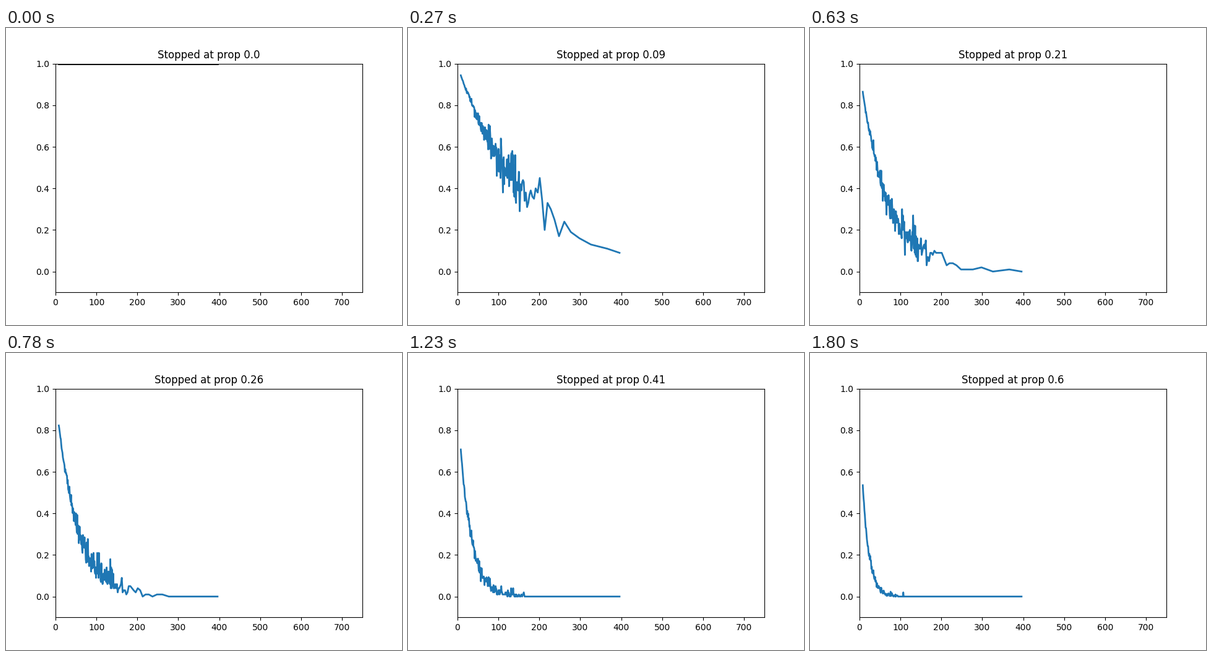
These frames come from a looping animation (640x480 px, 1830 ms). A matplotlib script:

```python
import numpy as np
import matplotlib.pyplot as plt
from matplotlib.animation import FuncAnimation

FRAMES = 61
INTERVAL = 30
BLUE = "#1f77b4"
LONGEST = 396

plt.rcParams["text.kerning_factor"] = 6
rng = np.random.default_rng(7)


def make_lengths():
    """Every whole length at first, then ever wider gaps."""
    xs, x = [], 8
    while x < LONGEST - 15:
        xs.append(x)
        x += max(1, round((x / 130) ** 4))
    return np.array(xs + [LONGEST])


def make_decay(xs):
    """Decay strength at prop 0.09: a smooth trend, roughest mid-range."""
    trend = np.interp(xs, [0, 100, 150, 200, 250, 290, 340, LONGEST],
                      [0.009, 0.61, 0.9, 1.1, 1.6, 1.9, 2.15, 2.4])
    rough = 0.15 * np.clip(np.sin(np.pi * xs / 300), 0, 1)
    return trend * (1 + rough * rng.standard_normal(xs.size))


def rate(p):
    return -np.log(1 - p * (0.575 + 0.305 * p))


def survival(p):
    """Share of runs left at each length, rounded to whole runs."""
    q = np.exp(-decay * rate(p) / rate(0.09))
    noise = 0.6 * np.sqrt(q * (1 - q) / runs) * rng.standard_normal(q.size)
    return np.clip(np.round((q + noise) * runs) / runs, 0, 1)


lengths = make_lengths()
decay = make_decay(lengths)
runs = 100 * np.ceil(200 * np.exp(-lengths / 18))
curves = [survival(i / 100) for i in range(FRAMES)]

fig, ax = plt.subplots(figsize=(6.4, 4.8), dpi=100)
ax.set_xlim(0, 750)
ax.set_ylim(-0.1, 1)
line, = ax.plot([], [], lw=2, color=BLUE)
title = ax.set_title("")


def update(i):
    line.set_data(lengths, curves[i])
    line.set_color(BLUE if i else "black")
    title.set_text(f"Stopped at prop {i / 100}")
    return line, title


anim = FuncAnimation(fig, update, frames=FRAMES, interval=INTERVAL,
                     repeat=True, repeat_delay=0)
plt.show()
```
